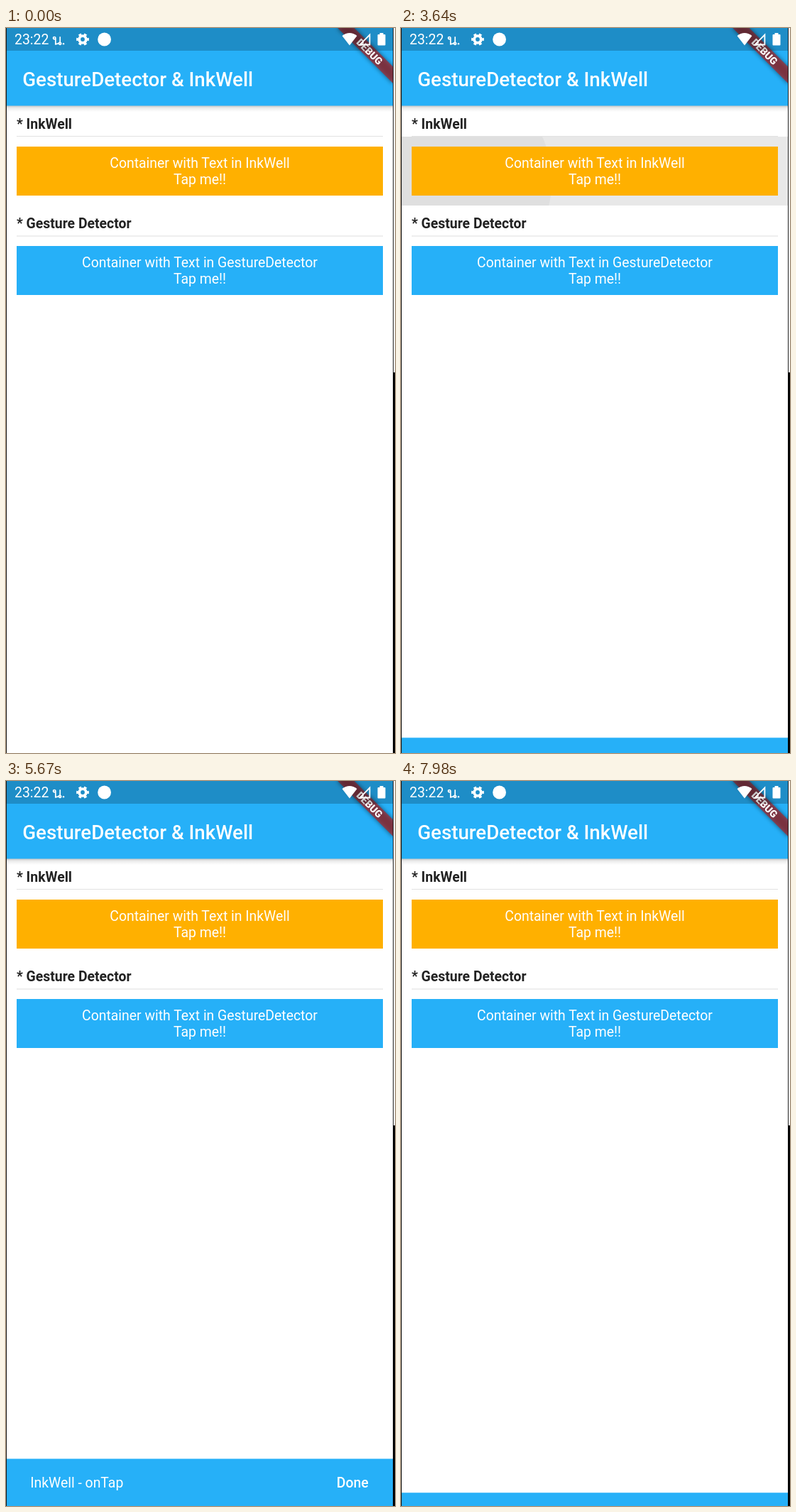
An HTML page for the animation above (8 s loop, 548 px wide and 1021 px high).

```html
<!DOCTYPE html>
<html lang="en">
<head>
<meta charset="utf-8">
<title>Tap demo</title>
<style>
  html, body { margin: 0; width: 100%; height: 100%; overflow: hidden; background: #fff; }
  svg { display: block; width: 548px; height: 1021px; font-family: Roboto, "Noto Sans", sans-serif; font-size: 19.4px; }
  .mid { text-anchor: middle; fill: #fff; }
  .head { font-weight: 700; fill: #222; }
  .blue { fill: #26b0f8; }
  .white { fill: #fff; }
  .line { fill: none; stroke: #fff; }
</style>
</head>
<body>
<svg viewBox="0 0 548 1021">
  <defs>
    <linearGradient id="shade" x1="0" y1="0" x2="0" y2="1">
      <stop offset="0" stop-color="#000" stop-opacity=".24"/>
      <stop offset=".4" stop-color="#000" stop-opacity=".08"/>
      <stop offset="1" stop-color="#000" stop-opacity="0"/>
    </linearGradient>
    <filter id="blur" x="-20%" y="-80%" width="140%" height="260%"><feGaussianBlur stdDeviation="3"/></filter>
    <clipPath id="app"><rect x="1" width="544" height="1021"/></clipPath>
    <clipPath id="well"><rect x="1" y="153" width="544" height="97"/></clipPath>
  </defs>

  <rect class="white" width="548" height="1021"/>
  <g clip-path="url(#app)">
    <rect x="15" y="152" width="516" height="1" fill="#e2e2e2"/>
    <rect x="15" y="292.5" width="516" height="1" fill="#dedede"/>

    <g clip-path="url(#well)">
      <rect id="highlight" x="1" y="153" width="544" height="97" fill="#bcbcbc" opacity="0"/>
      <circle id="splash" fill="#c8c8c8" opacity="0"/>
    </g>

    <text class="head" x="15" y="142">* InkWell</text>
    <rect x="15" y="167" width="516" height="69" fill="#ffb000"/>
    <text class="mid" x="273" y="197">Container with Text in InkWell</text>
    <text class="mid" x="273" y="219.5">Tap me!!</text>

    <text class="head" x="15" y="282">* Gesture Detector</text>
    <rect class="blue" x="15" y="307" width="516" height="69"/>
    <text class="mid" x="273" y="337">Container with Text in GestureDetector</text>
    <text class="mid" x="273" y="359.5">Tap me!!</text>

    <rect x="1" y="109" width="544" height="9" fill="url(#shade)"/>
    <rect class="blue" x="1" width="544" height="109.5"/>
    <text class="white" x="23.2" y="81.5" font-size="27.7" font-weight="500">GestureDetector &amp; InkWell</text>

    <g id="bar" visibility="hidden">
      <rect class="blue" x="1" width="544" height="68"/>
      <g id="content" class="white">
        <text id="label" x="34.2" y="40"></text>
        <text x="465.8" y="40" font-weight="500">Done</text>
      </g>
    </g>

    <g transform="translate(545.5 0) rotate(45)">
      <rect x="-55.4" y="38.8" width="110.8" height="16.6" opacity=".5" filter="url(#blur)"/>
      <rect x="-58" y="38.8" width="116" height="16.6" fill="#b71c1c" fill-opacity=".627"/>
      <text class="mid" y="52.2" font-size="14.1" font-weight="900">DEBUG</text>
    </g>

    <rect x="1" width="544" height="32" opacity=".2"/>
    <text class="white" x="12" y="23.3">23:22</text>
    <path class="line" stroke-width="1.7" d="M69.8 14.2a1.6 1.6 0 1 0-1.5 1.5q1.5 0 1.5-1.5v8.6q3.5-.3 6-2.6M76.2 12.2v8.2a1.5 1.5 0 1 0 1.4 1.4q0-1-1.4-1.4"/>
    <circle class="white" cx="81" cy="22.3" r="1.2"/>
    <circle class="line" cx="108" cy="16" r="4.8" stroke-width="3.8"/>
    <circle class="line" cx="108" cy="16" r="7.4" stroke-width="3" pathLength="12" stroke-dasharray="1 1" stroke-dashoffset=".5"/>
    <circle class="white" cx="138.6" cy="16" r="9.4"/>
    <path class="white" d="M484 24.5 473.5 11Q484 3 494.5 11Z"/>
    <path class="line" stroke-width="1.8" d="M512.4 9.5v14h-14Z"/>
    <path class="white" d="M526.5 7v2H524.5q-1 0-1 1V23.5q0 1 1 1h9q1 0 1-1V10q0-1-1-1H531.5V7Z"/>
  </g>

  <rect width="1" height="1021" fill="#161616"/>
  <rect x="545" width="1" height="486" fill="#222"/>
  <rect x="545" y="485" width="3" height="536" fill="#020204"/>
</svg>
<script>
const LOOP = 8000, STEP = 70;
const FADE = 200, SLIDE = 250, BAR_HEIGHT = 66.5;
const SCALE = 1.385;

const taps = [
  { x: 45, y: 214, down: 2030, up: 2635, off: 2625 },
  { x: 70, y: 214, down: 3465, up: 3575, off: 3610 }
];

// label, start of entry, end of exit
const bars = [
  ["InkWell - onTapDown", 2025, 2887],
  ["InkWell - onTap", 2890, 3711],
  ["InkWell - onTapDown", 3715, 4145],
  ["InkWell - onTap", 4145, 6410],
  ["GestureDetector - onTapDown", 6410, 6670],
  ["GestureDetector - onTap", 6670, 8047]
];

const $ = id => document.getElementById(id);
const [highlight, splash, bar, content, label] =
  ["highlight", "splash", "bar", "content", "label"].map($);
const clamp = v => Math.min(1, Math.max(0, v));

function set(el, attrs) {
  for (const key in attrs) el.setAttribute(key, attrs[key]);
}

// cubic-bezier(.4, 0, .2, 1)
function ease(x) {
  let lo = 0, hi = 1;
  for (let i = 0; i < 20; i++) {
    const s = (lo + hi) / 2, r = 1 - s;
    if (1.2 * s * r * r + 0.6 * s * s * r + s * s * s < x) lo = s; else hi = s;
  }
  return lo * lo * (3 - 2 * lo);
}

function drawInk(t) {
  const tap = taps.find(p => t >= p.down && t < p.off + FADE);
  if (!tap) {
    set(highlight, { opacity: 0 });
    set(splash, { opacity: 0 });
    return;
  }
  const fadeIn = clamp((t - tap.down) / FADE);
  const fadeOut = start => clamp(1 - (t - start) / FADE);
  const reach = Math.hypot(545 - tap.x, 61);
  const held = Math.min(t, tap.up) - tap.down;
  const freed = Math.max(0, t - tap.up);
  const r = Math.min(reach, reach * held / 1000 + freed * SCALE);
  set(highlight, { opacity: 0.4 * Math.min(fadeIn, fadeOut(tap.off)) });
  set(splash, { cx: tap.x, cy: tap.y, r, opacity: 0.4 * fadeOut(tap.up) });
}

function drawBar(t) {
  const item = bars.find(([, start, end]) => t >= start && t < end);
  set(bar, { visibility: item ? "visible" : "hidden" });
  if (!item) return;
  const [text, start, end] = item;
  const value = clamp(Math.min(t - start, end - t) / SLIDE);
  // A bar that has fully opened keeps its text solid while it leaves.
  const leaving = end - start >= 2 * SLIDE && t > end - SLIDE;
  label.textContent = text;
  set(bar, { transform: `translate(0 ${1021 - BAR_HEIGHT * ease(value)})` });
  set(content, { opacity: leaving ? 1 : ease(clamp((value - 0.72) / 0.28)) });
}

function frame(now) {
  const t = Math.floor(now % LOOP / STEP) * STEP;
  drawInk(t);
  drawBar(t);
  requestAnimationFrame(frame);
}
requestAnimationFrame(frame);
</script>
</body>
</html>
```
